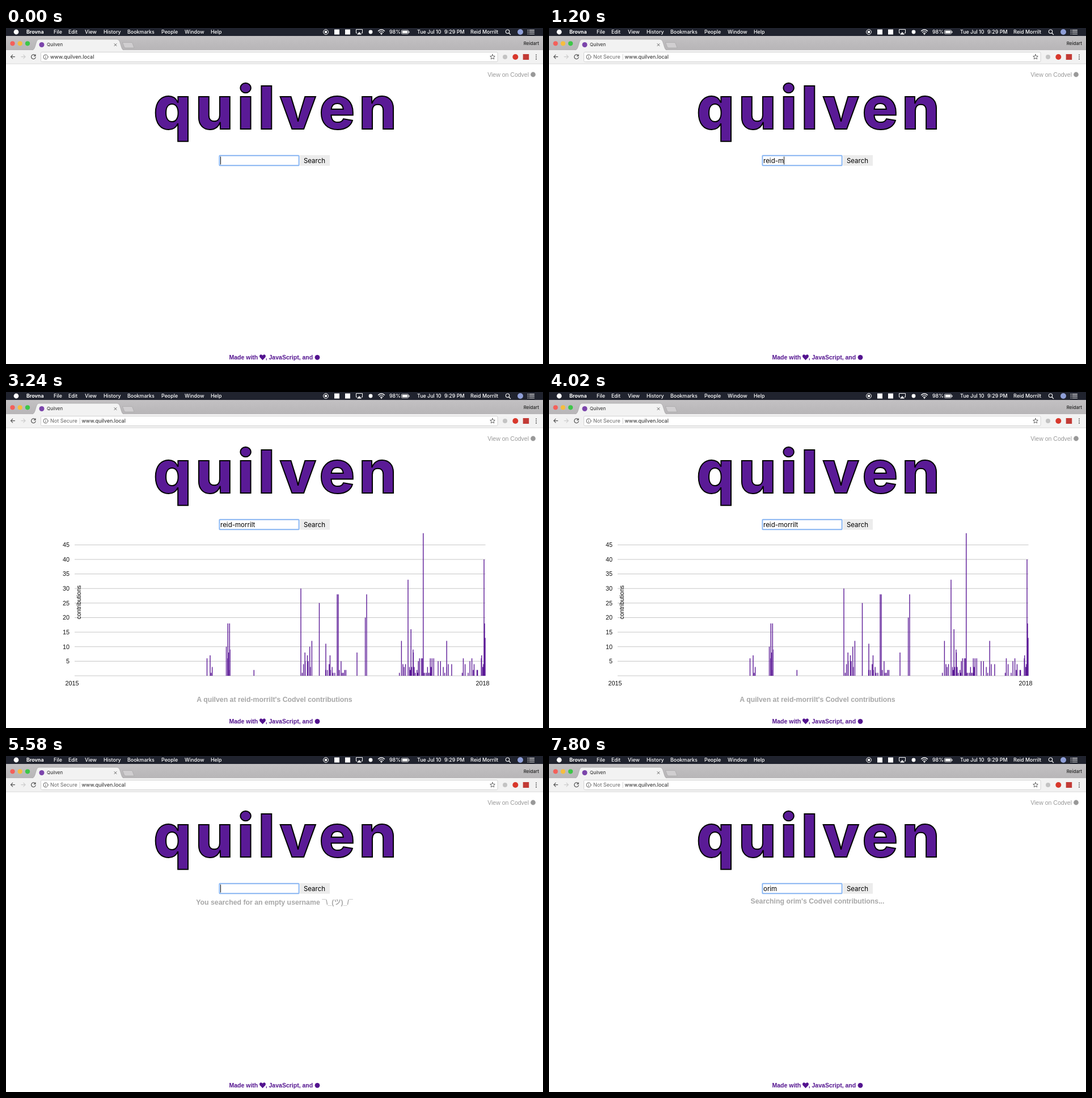
Animation, 947 px wide and 592 px high, one loop 8000 ms. Source, as an HTML page:

```html
<!DOCTYPE html>
<html lang="en">
<head>
<meta charset="utf-8">
<title>Quilven</title>
<style>
html, body { margin: 0; height: 100%; overflow: hidden; background: #fff; }
svg { display: block; width: 100vw; height: 100vh; }
text { font-family: "Liberation Sans", Arial, sans-serif; white-space: pre; }
.ui text { font-family: Inter, Roboto, sans-serif; }
.menu text { font-size: 8.9px; font-weight: 500; fill: #fff; }
.line { fill: none; stroke-linecap: round; stroke-linejoin: round; }
.url { font-size: 9px; fill: #222; }
.form { font-size: 11.5px; }
.msg { font-size: 12.3px; font-weight: bold; fill: #a7a7a7; text-anchor: middle; }
.foot { font-size: 10.5px; font-weight: bold; fill: #53138f; }
.axis { font-size: 10.8px; fill: #111; }
</style>
</head>
<body>
<svg viewBox="0 0 947 592">
  <defs>
    <linearGradient id="strip" x2="0" y2="1">
      <stop stop-color="#c3c1c3"/><stop offset="1" stop-color="#b7b5b7"/>
    </linearGradient>
  </defs>
  <rect width="947" height="592" fill="#fff"/>

  <g class="ui">
    <!-- menu bar -->
    <g class="menu">
      <rect width="947" height="14" fill="#20232e"/>
      <circle cx="18" cy="7" r="4.4" fill="#fff"/>
      <g id="menu"></g>
      <g fill="#fff">
        <circle cx="564" cy="7" r="4.4" fill="none" stroke="#fff"/>
        <rect x="562" y="5" width="4" height="4"/>
        <rect x="579" y="2.5" width="9" height="9"/>
        <rect x="598" y="2.5" width="9" height="9"/>
        <path d="M619 9h-1.5V2.5h11V9H627" class="line" stroke="#fff"/>
        <path d="M623 7l4 4.5h-8z"/>
        <circle cx="643" cy="7" r="3.4"/>
        <path d="M656.5 5.2a8 8 0 0 1 11 0M658.5 7.5a5 5 0 0 1 7 0M660.5 9.5a2.4 2.4 0 0 1 3 0" class="line" stroke="#fff" stroke-width="1.3"/>
        <circle cx="662" cy="11" r=".9"/>
        <rect x="697.5" y="3.8" width="12" height="6.6" rx="1" fill="none" stroke="#fff" stroke-width=".8"/>
        <rect x="698.8" y="5" width="9.5" height="4.2"/>
        <rect x="710.3" y="5.7" width="1.2" height="3"/>
        <path d="M887 9l2.6 2.6" class="line" stroke="#fff" stroke-width="1.2"/>
        <circle cx="884.5" cy="6.2" r="3.2" fill="none" stroke="#fff" stroke-width="1.1"/>
        <circle cx="907" cy="7" r="5" fill="#8f9fd8"/>
        <path d="M920 3.8h1m2 0h8.5M920 7.2h1m2 0h8.5M920 10.5h1m2 0h8.5" class="line" stroke="#fff" stroke-width="1.2"/>
      </g>
    </g>

    <!-- tab strip -->
    <rect y="14" width="947" height="25" fill="url(#strip)"/>
    <circle cx="11.5" cy="27.3" r="4.1" fill="#f4605a"/>
    <circle cx="24.7" cy="27.3" r="4.1" fill="#f6bd3f"/>
    <circle cx="38" cy="27.3" r="4.1" fill="#3dc648"/>
    <path d="M45 39.5C50 39 51 34 53.5 25Q55 20 58 20H196Q199 20 200.5 24C204 34 204 39 209 39.5z" fill="#f2f2f2" stroke="#9d9b9d" stroke-width=".6"/>
    <path d="M205.5 25.5H221Q222.5 25.5 223 27L226 35H211Q209 35 208.3 33z" fill="#d0ced0" stroke="#a3a1a3" stroke-width=".6"/>
    <circle cx="63" cy="29.5" r="4.5" fill="#7b45ab"/>
    <text x="72" y="32.3" font-size="7.9" fill="#222">Quilven</text>
    <path d="M191 27.6l4 4m0-4l-4 4" class="line" stroke="#555" stroke-width=".9"/>
    <text x="940" y="30.3" font-size="8" font-weight="500" text-anchor="end" fill="#222">Reidart</text>

    <!-- toolbar -->
    <rect y="39" width="947" height="24" fill="#f2f2f2"/>
    <rect y="62.7" width="947" height=".8" fill="#cfcfcf"/>
    <g class="line" stroke="#555" stroke-width="1.2">
      <path d="M15.5 50.6H8.5m3.2-3.3l-3.3 3.3l3.3 3.3"/>
      <path d="M27 50.6h7m-3.2-3.3l3.3 3.3l-3.3 3.3" stroke="#ccc"/>
      <path d="M51.2 48.2a3.8 3.8 0 1 0 .9 3.4M52 46.8v2.5h-2.6"/>
    </g>
    <rect x="61.5" y="42.5" width="805.5" height="17" rx="2" fill="#fff" stroke="#cacaca" stroke-width=".8"/>
    <g class="line" stroke="#555" stroke-width=".9">
      <circle cx="70" cy="51" r="4"/>
      <path d="M70 50.6v2.4m0-4.1v.1"/>
      <path d="M858 46.6l1.3 2.8l3 .3l-2.3 2.1l.7 3l-2.7-1.6l-2.7 1.6l.7-3l-2.3-2.1l3-.3z"/>
    </g>
    <g id="insecure">
      <text class="url" x="78" y="54.2" style="fill:#666">Not Secure</text>
      <rect x="129.8" y="46" width=".7" height="10" fill="#bbb"/>
    </g>
    <text id="url" class="url" y="54.2">www.quilven.local</text>
    <circle cx="880" cy="51" r="4" fill="#c3c3c3"/>
    <circle cx="898.3" cy="51" r="5" fill="#d8382c"/>
    <rect x="911.7" y="46" width="10.5" height="10" fill="#c23b36"/>
    <path d="M935 47.4v.01m0 3.6v.01m0 3.6v.01" class="line" stroke="#555" stroke-width="2"/>

    <!-- heading and form -->
    <text x="478" y="178" font-size="105" font-weight="800" letter-spacing="7" text-anchor="middle" fill="#5a1a96" stroke="#000" stroke-width="2">quilven</text>
    <rect x="375.3" y="223.6" width="142.4" height="19.8" rx="2" fill="#c5dcf9"/>
    <rect x="376.5" y="224.8" width="140" height="17.4" rx="1" fill="#fff" stroke="#86b4f2" stroke-width="1.7"/>
    <text id="query" class="form" x="378" y="238"></text>
    <rect id="caret" y="226.5" width="1" height="14" fill="#111"/>
    <rect x="518.5" y="224" width="52.5" height="18.7" fill="#ececec"/>
    <text class="form" x="544" y="238" text-anchor="middle">Search</text>
  </g>

  <text x="922" y="85.5" font-size="10.5" text-anchor="end" fill="#999">View on Codvel</text>
  <circle cx="929.5" cy="82" r="4.4" fill="#999"/>
  <text id="status" class="msg" x="473.5"></text>

  <g id="chart">
    <g id="grid"></g>
    <path id="bars" stroke="#5c1a97" stroke-width="1.4"/>
    <text class="axis" x="116.5" y="516.7" text-anchor="middle">2015</text>
    <text class="axis" x="840.5" y="516.7" text-anchor="middle">2018</text>
    <text font-size="10.5" text-anchor="middle" transform="translate(131.5 370.5) rotate(-90)">contributions</text>
    <text class="msg" x="473.5" y="546">A quilven at reid-morrilt's Codvel contributions</text>
  </g>

  <g class="foot">
    <text x="393.5" y="584">Made with</text>
    <path d="M452.5 585.2l-4.6-4.7c-2-2.3-.2-5.5 2.3-5.1q1.5.2 2.3 1.6q.8-1.4 2.3-1.6c2.5-.4 4.3 2.8 2.3 5.1z"/>
    <text x="457.7" y="584">, JavaScript, and</text>
    <circle cx="549" cy="580.3" r="4.4"/>
  </g>
</svg>

<script>
const LOOP = 8000, BASE = 500, UNIT = 5.126;
const $ = id => document.getElementById(id);
const show = (id, on) => $(id).setAttribute("visibility", on ? "visible" : "hidden");

const menu = {
  Brovna: 36, File: 84, Edit: 110, View: 139, History: 172, Bookmarks: 214, People: 274,
  Window: 315, Help: 361, "98%": 676, "Tue Jul 10": 725, "9:29 PM": 773, "Reid Morrilt": 819
};
$("menu").innerHTML = Object.entries(menu).map(([label, x], i) =>
  `<text x="${x}" y="10.3" style="font-weight:${i ? 500 : 700}">${label}</text>`).join("");

let grid = "";
for (let v = 0; v <= 45; v += 5) {
  const y = BASE - v * UNIT;
  grid += `<path d="M121 ${y}H845.5" stroke="#c6c6c6"/>`;
  if (v) grid += `<text class="axis" x="112" y="${y + 3.8}" text-anchor="end">${v}</text>`;
}
$("grid").innerHTML = grid;

let seed = 7;
const random = () => (seed = seed * 16807 % 2147483647) / 2147483647;
const bar = (x, n) => `M${x} ${BASE}v${-n * UNIT}`;

// the busiest days, by x
const peaks = {
  354.5: 6, 391.3: 18, 394.3: 18, 437.3: 2, 520: 30, 539.4: 12, 552.5: 25, 564: 11, 584: 28, 586: 28,
  619: 8, 633.6: 20, 636: 28, 697.4: 12, 709: 33, 714.2: 16, 735.8: 49, 777.2: 12, 843: 40, 844: 18
};
// busy spells: from, to, days, highest count
const spells = [
  [360, 364, 3, 7], [388, 396, 5, 14], [521, 538, 8, 11], [562, 580, 9, 8], [587, 601, 6, 5],
  [692, 706, 5, 6], [710, 728, 11, 10], [729, 755, 14, 6], [762, 787, 7, 5], [803, 834, 10, 6], [837, 845, 6, 13]
];
let bars = Object.entries(peaks).map(([x, n]) => bar(x, n)).join("");
for (const [from, to, days, top] of spells)
  for (let i = 0; i < days; i++)
    bars += bar(from + (to - from) * (i + random()) / days, Math.ceil(top * random() ** 1.5));
$("bars").setAttribute("d", bars);

const USER = "reid-morrilt", OTHER = "orim";
const TYPE = 360, FIND = 2340, DRAW = 3000, CLEAR = 4400, EMPTY = 5340, RETYPE = 6780, REFIND = 7500;
const typed = (word, t, start) => word.slice(0, Math.max(0, Math.floor((t - start) / 160) + 1));
const searching = name => `Searching ${name}'s Codvel contributions...`;

function render(t) {
  const query = $("query"), status = $("status");
  query.textContent = t < CLEAR ? typed(USER, t, TYPE) : typed(OTHER, t, RETYPE);

  const empty = t >= EMPTY && t < REFIND;
  status.setAttribute("y", empty ? 262 : 260);
  status.textContent =
    t >= REFIND ? searching(OTHER) :
    empty ? "You searched for an empty username ¯\\_(ツ)_/¯" :
    t >= FIND && t < DRAW ? searching(USER) : "";

  show("chart", t >= DRAW && t < CLEAR);
  show("insecure", t >= TYPE);
  $("url").setAttribute("x", t >= TYPE ? 133.5 : 78);

  const waiting = t >= CLEAR && t < RETYPE;
  const blink = !waiting || (t - CLEAR) % 1060 < 530;
  const focused = t < FIND || (t >= CLEAR && t < REFIND);
  show("caret", focused && blink);
  $("caret").setAttribute("x", 378 + (query.textContent ? query.getComputedTextLength() : 0));
}

const begin = performance.now();
function tick(now) {
  render(Math.max(0, now - begin) % LOOP);
  requestAnimationFrame(tick);
}
render(0);
requestAnimationFrame(tick);
</script>
</body>
</html>
```
